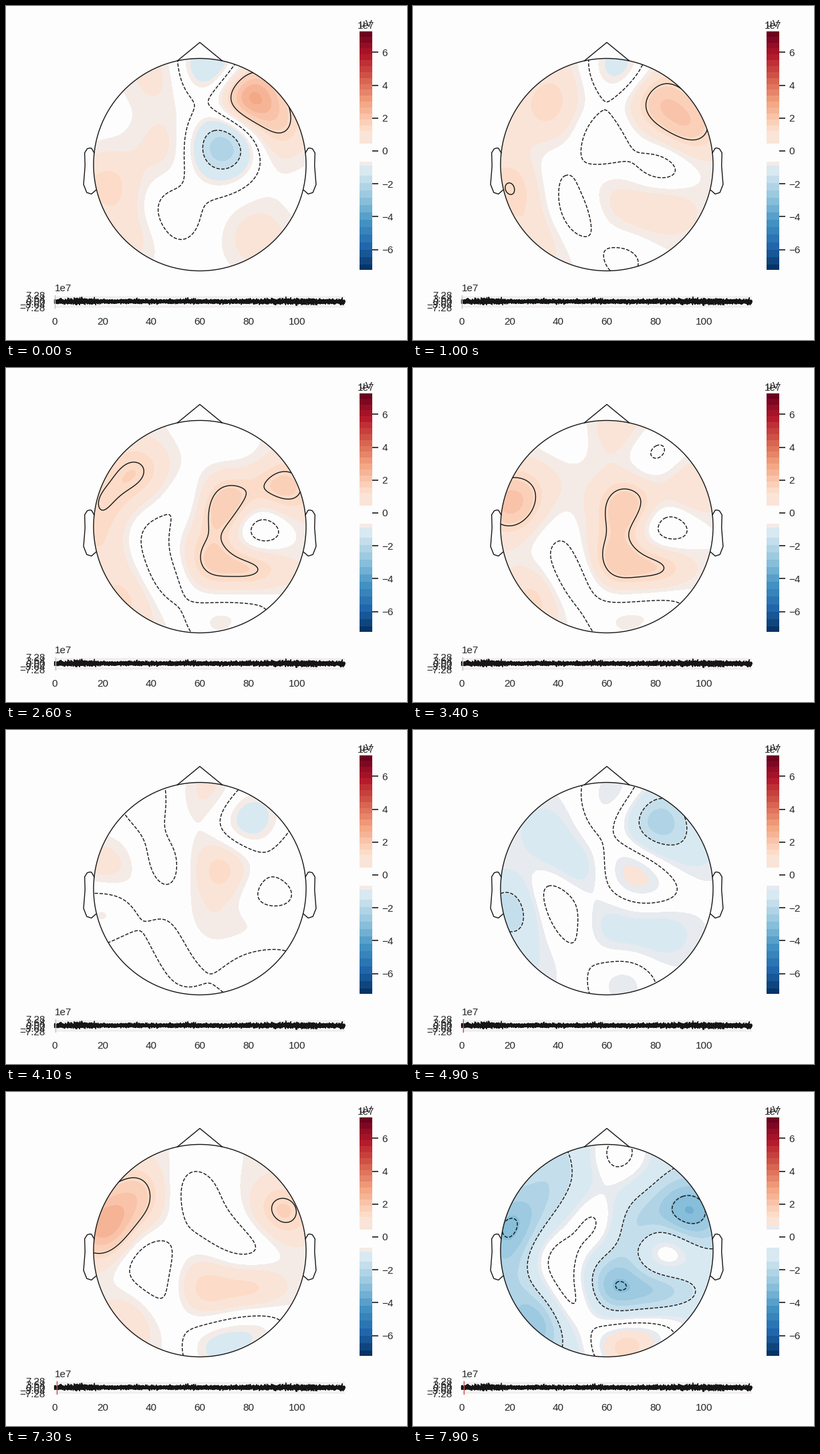
Recreate the animation shown at these times as a matplotlib script. Size 600x500 px, loop 8000 ms.

```python
import numpy as np
import matplotlib
import matplotlib.pyplot as plt
from matplotlib.animation import FuncAnimation
from matplotlib.patches import Circle, Rectangle

plt.rcParams["font.family"] = "Liberation Sans"
plt.rcParams["font.size"] = 11

FRAMES, INTERVAL = 80, 100
BG, INK, BLACK = "#fdfdfd", "#262626", "#151515"
VMAX = 7.28
CX, CY, R = 290, 237.5, 159
SPREAD = 36

# Scalp sites in pixels
SITES = dict(
    Fp=(225, 100), AF=(308, 90), F3=(200, 152), Fz=(275, 150), F4=(362, 135),
    F8=(412, 182), T7=(148, 203), TP=(150, 268), C3=(207, 247), FC=(240, 210),
    FCz=(282, 200), C2=(325, 210), C4=(374, 247), P3=(243, 314), Pz=(290, 298),
    P4=(372, 293), P7=(190, 342), POz=(285, 348), Oz=(315, 382), O4=(378, 348))

gx, gy = np.meshgrid(np.arange(130.5, 450), np.arange(78.5, 398))


def bump(x, y, px, py):
    return np.exp(-((x - px) ** 2 + (y - py) ** 2) / (2 * SPREAD ** 2))


def pose(base, **peaks):
    """Smooth field that rests at base and passes through the given peaks."""
    p = np.array([SITES[name] for name in peaks], float)
    v = np.array(list(peaks.values())) - base
    w = np.linalg.solve(bump(*p.T, *p.T[:, :, None]), v)
    return base + sum(wi * bump(gx, gy, *pi) for wi, pi in zip(w, p))


# Step -> scalp potential in 1e7 uV
KEYS = {
    0: pose(.25, Fp=.8, AF=-1.2, Fz=.1, F4=2.6, F8=1.6, TP=1.4, FC=.75,
            C2=-2.3, C4=-.1, P3=-.2, P7=.9, O4=1),
    19: pose(.75, AF=-.6, Fz=.1, F3=2.1, F8=2.1, FCz=-.1, C2=1.95, TP=1.5,
             C3=-.25, C4=-.2, P3=-.2, Pz=1.2, P4=1.4, P7=1.1, POz=.1, Oz=-.5, O4=.3),
    34: pose(.45, Fp=.1, AF=.95, F3=.8, F4=0, F8=1.15, T7=2.1, C3=.2, C2=1.8,
             C4=-.1, P3=-.3, Pz=1.5, P4=1.45, P7=1.2, POz=0, Oz=-.5, O4=0),
    49: pose(-.35, AF=.5, F3=-1, Fz=.05, F4=-2.2, F8=-1.1, TP=-1.8, C3=.2,
             FC=-.9, C2=.8, C4=.2, P3=0, Pz=-.8, P4=-.9, P7=-.7, Oz=.6),
    60: pose(-.8, Fp=-1.5, AF=.15, F3=-2.1, Fz=.4, F4=-2, F8=-4.5, T7=-2.7, C3=.4,
             FC=-1.45, C2=.1, C4=-.3, P3=-.3, Pz=-1.8, P4=-1.7, P7=-1.9,
             POz=-.1, Oz=2, O4=.5),
    73: pose(.45, F3=1.8, Fz=-.2, F8=1.6, T7=2.6, C3=-.3, C2=-.25, C4=.15,
             P3=.1, Pz=1.3, P4=1.25, P7=1, POz=.1, Oz=-.9, O4=-.4),
    79: pose(-1.2, Fp=-1.6, AF=.2, F3=-2, Fz=-.5, F8=-3.3, T7=-3, TP=-2.1, C3=.1,
             FCz=-.2, C2=-1.8, C4=-.35, P3=0, Pz=-2.5, P4=-2.2, P7=-2.6,
             POz=-.1, Oz=1.4, O4=-.1),
}
TIMES = list(KEYS)


def potential(i):
    k = min(np.searchsorted(TIMES, i, side="right"), len(TIMES) - 1)
    a, b = TIMES[k - 1], TIMES[k]
    u = (i - a) / (b - a)
    u = u * u * (3 - 2 * u)
    return (1 - u) * KEYS[a] + u * KEYS[b]


# Colour bands: white centre, one pale rim, then steps along the map
cmap = matplotlib.colormaps["RdBu_r"]
warm = np.r_[.45, .7, np.arange(1.2, 7.5, .36)]
cool = np.r_[.45, .7, np.arange(1.5, 7.5, .45)]
EDGES = np.r_[-cool[::-1], warm]
MID = len(cool)
ends = np.r_[-7.6, EDGES, 7.6]
BANDS = cmap(.5 + (ends[1:] + ends[:-1]) / 2 / (2 * VMAX))[:, :3]
BANDS[MID] = matplotlib.colors.to_rgb(BG)
PINK, GREY = np.array([244, 235, 231]) / 255, np.array([231, 234, 239]) / 255

LEVELS = np.arange(-4, 5) * VMAX / 5
STYLES = ["dashed" if v <= 0 else "solid" for v in LEVELS]

fig = plt.figure(figsize=(6, 5), dpi=100, facecolor=BG)
ax = fig.add_axes([0, 0, 1, 1])
ax.set_xlim(0, 600)
ax.set_ylim(500, 0)
ax.axis("off")
ax.autoscale(False)


def line(x, y, color=BLACK, lw=1.0, **kw):
    return ax.plot(x, y, color=color, lw=lw, **kw)[0]


def label(x, y, s, ha="center"):
    ax.text(x, y, s.replace("-", "\u2212"), color=INK, ha=ha, va="center_baseline")


def picture(data, *extent):
    return ax.imshow(data, extent=extent, aspect="auto", interpolation="nearest")


# Head
topo = picture(np.ones(gx.shape + (3,)), 130, 450, 398, 78)
head = Circle((CX, CY), R, fill=False, ec=BLACK, lw=1.0, zorder=5)
ax.add_patch(head)
topo.set_clip_path(head)
line([256.5, 290, 323.5], [82, 54.5, 82], zorder=5)
ear_x = np.array([.497, .510, .518, .5299, .5419, .54, .547, .532, .510, .489])
ear_y = np.array([.0555, .0775, .0783, .0746, .0555,
                  -.0055, -.0932, -.1313, -.1384, -.1199])
for side in (-1, 1):
    line(CX + side * 2 * R * ear_x, CY - 2 * R * ear_y, zorder=5)

# Colour bar
TOP, BOTTOM, ZERO, UNIT = 38, 395, 217, 24.6
bar = (ZERO - np.arange(TOP + .5, BOTTOM)) / UNIT
idx = np.digitize(bar, EDGES)
idx[idx == MID + 1] += 1
idx[idx == MID - 1] -= 1
idx[(bar > -.66) & (bar < .42)] = MID
picture(BANDS[idx][:, None], 529, 548, BOTTOM, TOP)
pale = ax.add_patch(Rectangle((529, 233), 19, 6, lw=0))
for v in range(-6, 7, 2):
    y = ZERO - v * UNIT
    line([548, 556.5], [y, y], INK, 1.25, solid_capstyle="butt")
    label(562.5, y, str(v), "left")
label(538, 26, "\u00b5V")
label(526, 28, "1e7", "left")

# Signal strip
X0, X1, MIDY, PX_PER_S = 72.5, 507, 442.3, 3.628
ax.add_patch(Rectangle((X0, 433), X1 - X0, 18.6, fc="#f2eeee", lw=0))
for k in range(-2, 3):
    y = MIDY + 4.65 * k
    line([X0, X1], [y, y], "white", 1.0)
    label(59, y, f"{-k * VMAX / 2:.2f}" if k else "0.00", "right")
for s in range(0, 101, 20):
    label(X0 + s * PX_PER_S, 471.3, str(s))
label(73, 421.4, "1e7", "left")

rng = np.random.default_rng(4)
sec = np.linspace(0, 119.7, 8000)
swell = 1 + .4 * np.exp(-((sec - 10) / 5) ** 2) + .4 * np.exp(-((sec - 100) / 14) ** 2)
line(X0 + sec * PX_PER_S, MIDY + rng.normal(0, 1.45, sec.size) * swell, lw=1.0, zorder=3)
cursor = line([X0, X0], [433, 452], lw=1.0, zorder=4)

contours = []


def update(i):
    field = potential(i)
    mean = field.mean()
    tint = GREY if mean < -.1 else PINK
    BANDS[MID - 1] = BANDS[MID + 1] = tint
    topo.set_data(BANDS[np.digitize(field, EDGES)])

    while contours:
        contours.pop().remove()
    cs = ax.contour(gx[::2, ::2], gy[::2, ::2], field[::2, ::2], levels=LEVELS,
                    colors=BLACK, linewidths=1.0, linestyles=STYLES, zorder=2)
    cs.set_clip_path(head)
    contours.append(cs)

    pale.set_facecolor(tint)
    pale.set_y(200 if mean < -.55 else 233)
    x = X0 + (i + 8) // 27
    cursor.set_xdata([x, x])
    cursor.set_color("#c44e52" if i >= 46 else "#c9c3c3")
    return []


anim = FuncAnimation(fig, update, frames=FRAMES, interval=INTERVAL,
                     init_func=lambda: [], repeat=True, repeat_delay=0)
plt.show()
```
